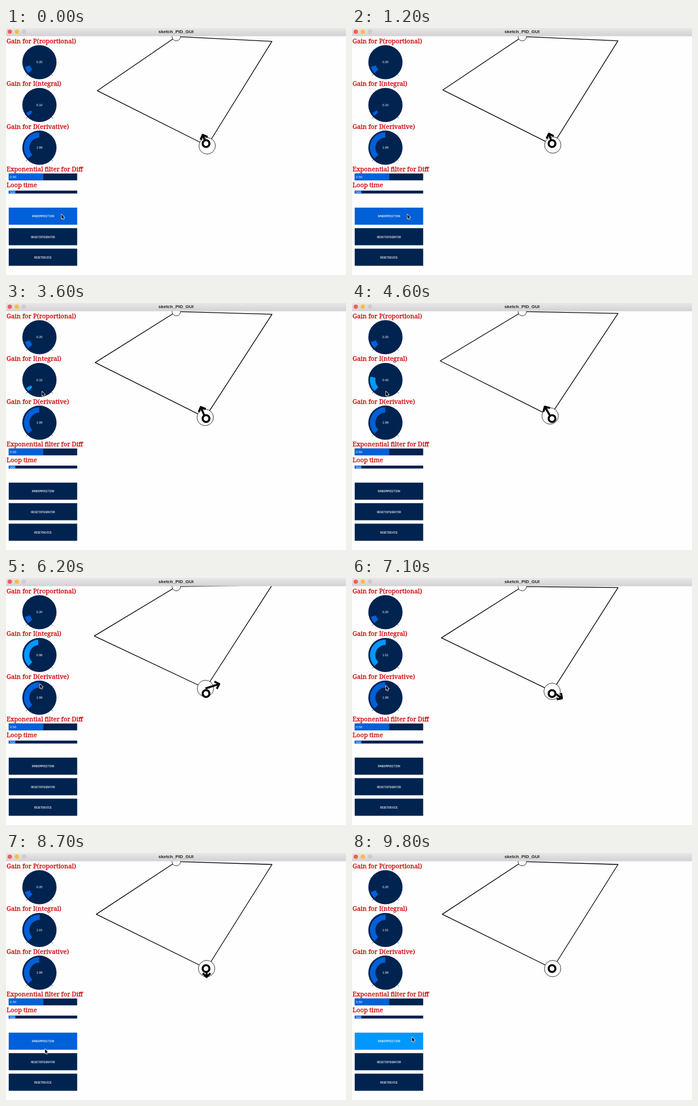
Write an HTML page with a canvas that moves like this. It is 600x436 px and loops after 9900 ms.

```html
<!DOCTYPE html>
<html lang="en">
<head>
<meta charset="utf-8">
<title>sketch_PID_GUI</title>
<style>
  html, body { margin: 0; width: 100%; height: 100%; overflow: hidden; background: #fefefe; }
  canvas { display: block; }
</style>
</head>
<body>
<canvas id="stage" width="600" height="436"></canvas>
<script>
const ctx = document.getElementById('stage').getContext('2d');
const LOOP = 9900, STEP = 100;
const DARK = '#002350', BLUE = '#0060d8', ACTIVE = '#0098ff', PAPER = '#fefefe', RED = '#cc0000';
const RAD = Math.PI / 180;
const DRAG_START = 3900, DRAG_END = 7900, PRESS = 9800;
const LEFT = 4.8, WIDTH = 120.8, BUTTON_HEIGHT = 30.2;

// Each row: time, then the values at that time.
const cursorPath = [
  [0, 97, 328], [2700, 97, 328], [3700, 59, 136], [3900, 59, 136], [4600, 59, 155],
  [6200, 59, 186], [6800, 59, 189], [7900, 59, 189], [8700, 68, 345], [9800, 105, 324]
];
const effectorPath = [
  [0, 355, 208], [2500, 353.5, 205], [4600, 349.7, 199.4],
  [6200, 352, 195], [7800, 354, 204], [9900, 354, 204]
];
// Arrow length and direction in degrees.
const forcePath = [
  [0, 21, -112], [2500, 21.2, -105], [4600, 19, -120],
  [6200, 25.5, -18], [7800, 18, 77], [8700, 15, 90], [9900, 15, 90]
];

function sample(path, t) {
  let i = 1;
  while (i < path.length - 1 && path[i][0] < t) i++;
  const a = path[i - 1], b = path[i];
  const k = Math.min(1, (t - a[0]) / (b[0] - a[0]));
  return a.slice(1).map((v, j) => v + (b[j + 1] - v) * k);
}

function rect(x, y, w, h, color) {
  ctx.fillStyle = color;
  ctx.fillRect(x, y, w, h);
}

function circle(x, y, r, fill, stroke, width) {
  ctx.beginPath();
  ctx.arc(x, y, r, 0, 2 * Math.PI);
  if (fill) { ctx.fillStyle = fill; ctx.fill(); }
  if (stroke) { ctx.strokeStyle = stroke; ctx.lineWidth = width; ctx.stroke(); }
}

function polyline(points, width, closed) {
  ctx.beginPath();
  points.forEach(p => ctx.lineTo(...p));
  if (closed) ctx.closePath();
  ctx.strokeStyle = '#000';
  ctx.lineWidth = width;
  ctx.lineJoin = 'round';
  ctx.stroke();
}

function text(str, x, y, font, color, align = 'left', spacing = 0) {
  ctx.font = font;
  ctx.fillStyle = color;
  ctx.textAlign = align;
  ctx.letterSpacing = spacing + 'px';
  ctx.fillText(str, x, y);
}

function label(str, y) {
  text(str, 1, y, '11.2px "Noto Serif", serif', RED);
  // A hairline outline gives the slightly heavier stems.
  ctx.strokeStyle = RED;
  ctx.lineWidth = 0.3;
  ctx.strokeText(str, 1, y);
}

const number = (str, x, y, align) =>
  text(str, x, y, '5.7px "Liberation Sans", sans-serif', '#fff', align);

const inside = ([px, py], x, y, w, h) => px >= x && px <= x + w && py >= y && py <= y + h;
const polar = ([x, y], r, angle) => [x + r * Math.cos(angle), y + r * Math.sin(angle)];

function knob(y, value, max, active) {
  const x = 59, start = 135 * RAD, end = start + value / max * 270 * RAD;
  circle(x, y, 30.2, DARK);
  ctx.beginPath();
  ctx.arc(x, y, 22.5, start, end);
  ctx.strokeStyle = active ? ACTIVE : BLUE;
  ctx.lineWidth = 9.5;
  ctx.stroke();
  for (const a of [45, 135]) {
    ctx.strokeStyle = DARK;
    ctx.lineWidth = 1;
    ctx.beginPath();
    ctx.moveTo(...polar([x, y], 31, a * RAD));
    ctx.lineTo(...polar([x, y], 33, a * RAD));
    ctx.stroke();
  }
  number(value.toFixed(2), x, y + 2, 'center');
}

function slider(y, h, fill, str, active) {
  rect(LEFT, y, WIDTH, h, DARK);
  rect(LEFT, y, fill, h, active ? ACTIVE : BLUE);
  number(str, 7, y + h / 2 + 2);
}

function button(y, str, color) {
  rect(LEFT, y, WIDTH, BUTTON_HEIGHT, color);
  text(str, 65, y + 17.2, '5.5px "Liberation Mono", monospace', '#fff', 'center', -0.5);
}

function panel(t, cursor) {
  const dragging = t >= DRAG_START && t < DRAG_END;
  const dragY = t < DRAG_START ? 136 : dragging ? cursor[1] : 189;
  const integral = 0.1 + (dragY - 136) * 0.91 / 53;
  const knobs = [
    ['P(roportional)', 60.4, 0.2, 2], ['I(ntegral)', 135.9, integral, 2], ['D(erivative)', 211.3, 1.99, 4]
  ];
  knobs.forEach(([name, y, value, max], i) => {
    const hover = Math.hypot(cursor[0] - 59, cursor[1] - y) < 30;
    label('Gain for ' + name, y - 33.5);
    knob(y, value, max, dragging ? i === 1 : hover);
  });

  const over = (y, h) => !dragging && inside(cursor, LEFT, y, WIDTH, h);
  label('Exponential filter for Diff', 253.4);
  slider(256.8, 12.1, 61, '0.50', over(256.8, 12.1));
  label('Loop time', 280.8);
  slider(287, 5.2, 12, '500', over(287, 5.2));

  ['RANDOMPOSITION', 'RESETINTEGRATOR', 'RESETDEVICE'].forEach((name, i) => {
    const y = 317.1 + i * 36.2, hover = over(y, BUTTON_HEIGHT);
    button(y, name, hover ? (t >= PRESS ? ACTIVE : BLUE) : DARK);
  });
}

// Two equal arms hinged at one base; elbows follow from the effector position.
function linkage(t) {
  const base = [300.5, 15.2], upper = 169, lower = 217;
  const effector = sample(effectorPath, t);
  const dx = effector[0] - base[0], dy = effector[1] - base[1];
  const d = Math.hypot(dx, dy), heading = Math.atan2(dy, dx);
  const bend = Math.acos((upper * upper + d * d - lower * lower) / (2 * upper * d));
  const left = polar(base, upper, heading + bend);
  const right = polar(base, upper, heading - bend);

  polyline([base, left, effector, right], 1.3, true);
  circle(...base, 7.5, PAPER, '#000', 0.8);
  circle(...effector, 14.5, PAPER, '#000', 0.8);

  if (t < PRESS) {
    const [length, degrees] = sample(forcePath, t), angle = degrees * RAD;
    const tip = polar(effector, length, angle);
    const [barbA, barbB] = [-135, 135].map(a => polar(tip, 9.5, angle + a * RAD));
    polyline([effector, tip], 3.5);
    polyline([barbA, tip, barbB], 3.5);
  }
  circle(353, 204, 6, PAPER, '#000', 3.6);
}

function titleBar() {
  const shade = ctx.createLinearGradient(0, 0, 0, 14.5);
  shade.addColorStop(0, '#e8e6e8');
  shade.addColorStop(1, '#d3d1d3');
  rect(0, 0, 600, 14.5, shade);
  ['#fc5b57', '#fdbc40', '#cdcbcd'].forEach((c, i) => circle(6.7 + i * 12.4, 6.5, 3.8, c));
  text('sketch_PID_GUI', 300, 9.2, 'bold 8px "Liberation Sans", sans-serif', '#222', 'center');
}

function pointer([x, y]) {
  const shape = [[0, 0], [0, 9], [2, 7.2], [3.5, 10.5], [5, 9.8], [3.6, 6.6], [6.3, 6.5]];
  ctx.beginPath();
  shape.forEach(([px, py]) => ctx.lineTo(x + 0.8 + px * 0.85, y + 1 + py * 0.85));
  ctx.closePath();
  ctx.strokeStyle = '#fff';
  ctx.lineWidth = 1.4;
  ctx.stroke();
  ctx.fillStyle = '#000';
  ctx.fill();
}

function draw(now) {
  const t = Math.floor(now % LOOP / STEP) * STEP;
  const cursor = sample(cursorPath, t);
  rect(0, 0, 600, 436, PAPER);
  linkage(t);
  panel(t, cursor);
  titleBar();
  pointer(cursor);
  requestAnimationFrame(draw);
}
requestAnimationFrame(draw);
</script>
</body>
</html>
```
